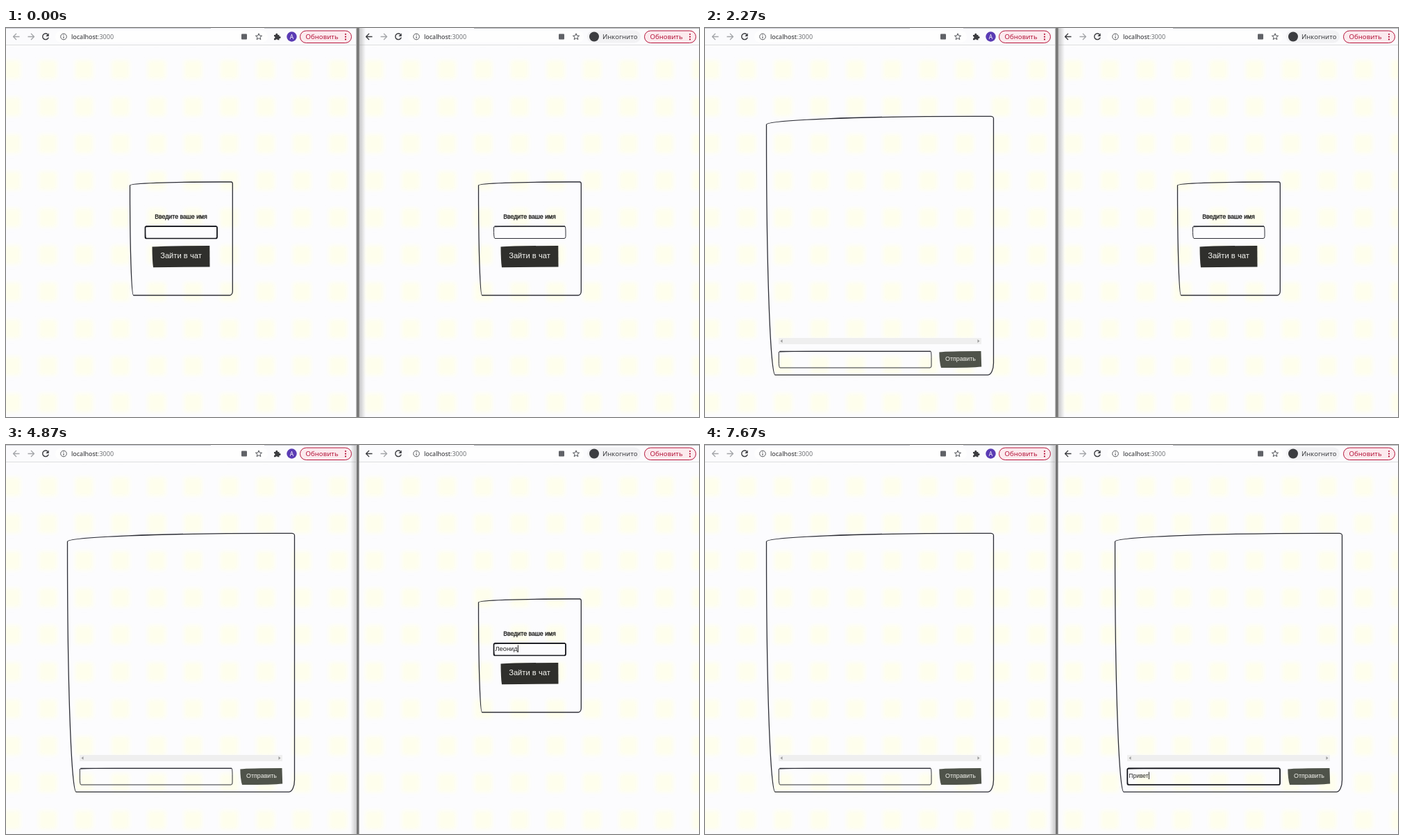
Recreate the animation shown at these times as an HTML page. Size 998 px wide and 561 px high, loop 8 s.

```html
<!DOCTYPE html>
<html lang="ru">
<head>
<meta charset="utf-8">
<title>Чат в двух окнах</title>
<style>
html, body { margin: 0; width: 100%; height: 100%; overflow: hidden; background: #fcfcfe; }
svg { display: block; width: 998px; height: 561px; }
text { font-family: "Liberation Sans", Arial, sans-serif; }
.ui text { font-family: "Noto Sans", "Open Sans", sans-serif; }
</style>
</head>
<body>
<svg id="stage" viewBox="0 0 998 561" xmlns="http://www.w3.org/2000/svg">
  <defs>
    <filter id="soft" x="-50%" y="-50%" width="200%" height="200%"><feGaussianBlur stdDeviation="3"/></filter>
    <pattern id="dots" x="-18" y="33.5" width="52.25" height="53.4" patternUnits="userSpaceOnUse">
      <rect x="13" y="13" width="26" height="27" rx="3" fill="#fefeec" filter="url(#soft)"/>
    </pattern>
    <linearGradient id="fadeR"><stop offset="0" stop-color="#777" stop-opacity=".4"/><stop offset="1" stop-color="#777" stop-opacity="0"/></linearGradient>
    <linearGradient id="fadeL"><stop offset="0" stop-color="#777" stop-opacity="0"/><stop offset="1" stop-color="#777" stop-opacity=".4"/></linearGradient>
    <linearGradient id="edge"><stop offset="0" stop-color="#c4c4c4"/><stop offset=".5" stop-color="#6a6a6a"/><stop offset="1" stop-color="#999"/></linearGradient>
  </defs>
  <rect width="998" height="561" fill="#fcfcfe"/>
  <rect y="25" width="998" height="536" fill="url(#dots)"/>
</svg>
<script>
const INK = '#2d2e36', GREY = '#a3a5a9', DARK = '#3b3c40', RED = '#b5153b';
const LOOP = 8000;
const stage = document.getElementById('stage');

function add(parent, tag, attrs, text) {
  const el = document.createElementNS('http://www.w3.org/2000/svg', tag);
  for (const k in attrs) el.setAttribute(k, attrs[k]);
  if (text) el.textContent = text;
  parent.appendChild(el);
  return el;
}
const rect = (p, x, y, width, height, fill, more) => add(p, 'rect', { x, y, width, height, fill, ...more });
const line = (p, d, stroke, w = 1.2) =>
  add(p, 'path', { d, fill: 'none', stroke, 'stroke-width': w, 'stroke-linejoin': 'round' });
const label = (p, x, y, size, fill, str, more) =>
  add(p, 'text', { x, y, fill, 'font-size': size, ...more }, str);
const show = (el, on) => el.setAttribute('visibility', on ? 'inherit' : 'hidden');

// Box with elliptical corners, radii in the order TL, TR, BR, BL
function wobbly(x, y, w, h, [a, b, c, d, e, f, g, i]) {
  const r = x + w, m = y + h;
  return `M${x} ${y + b}A${a} ${b} 0 0 1 ${x + a} ${y}L${r - c} ${y}A${c} ${d} 0 0 1 ${r} ${y + d}` +
    `L${r} ${m - f}A${e} ${f} 0 0 1 ${r - e} ${m}L${x + g} ${m}A${g} ${i} 0 0 1 ${x} ${m - i}Z`;
}

function field(p, x, y, w, h, size, base) {
  const thin = line(p, wobbly(x, y, w, h, [60, 1, 1, 8, 2, 3, 1.5, 9]), INK, 1);
  const top = line(p, `M${x + 1} ${y}H${x + w - 1}`, INK, 1.3);
  const bold = add(p, 'rect', { x, y, width: w, height: h, rx: 2, fill: 'none', stroke: '#15161c', 'stroke-width': 1.7 });
  const text = label(p, x + 2, base, size, '#222');
  const caret = rect(p, 0, base - 8.5, 1, 10.5, '#222');
  return (str, focus, hasCaret) => {
    bold.setAttribute('opacity', focus);
    text.textContent = str;
    show(caret, hasCaret);
    caret.setAttribute('x', x + 2.2 + (str ? text.getComputedTextLength() : 0));
  };
}

function page(dx) {
  const root = add(stage, 'g', { transform: `translate(${dx})` });

  const login = add(root, 'g');
  line(login, wobbly(178.5, 222, 147.8, 163.5, [130, 5, 2, 3, 4, 6, 5, 150]), INK, 1.3);
  label(login, 252, 274.5, 8.75, '#181818', 'Введите ваше имя',
    { 'text-anchor': 'middle', stroke: '#181818', 'stroke-width': .3 });
  const setName = field(login, 200.5, 286, 103.5, 17.5, 9.3, 297);
  add(login, 'path', { d: 'M210.5 315.5Q230 314 293.3 314L293.5 344.5L212 345.2Q210.6 335 210.5 315.5Z', fill: '#2f2f2c' });
  label(login, 252, 332, 11.2, '#f6f6f2', 'Зайти в чат', { 'text-anchor': 'middle' });

  const chat = add(root, 'g');
  line(chat, wobbly(88.5, 127.3, 327, 373, [300, 12, 4, 3, 8, 17, 12.5, 345]), INK, 1.3);
  const bar = add(chat, 'g');
  rect(bar, 106, 447, 292, 9, '#efefef');
  add(bar, 'path', { d: 'M111.5 449V454L108.5 451.5ZM392.5 449V454L395.5 451.5Z', fill: '#9c9c9c' });
  const setMsg = field(chat, 106.3, 466.3, 219.7, 23.7, 8.5, 480);
  add(chat, 'path', { d: 'M337.3 467.5Q350 466 397.5 466L398.2 488.5Q385 490 340 490Q337.5 482 337.3 467.5Z', fill: '#4f534a' });
  label(chat, 368, 480, 8.9, '#f4f4ee', 'Отправить', { 'text-anchor': 'middle' });

  return { login, chat, bar, setName, setMsg };
}

function arrow(p, x, dir, color) {
  line(p, `M${x - 4.5 * dir} 12.5H${x + 4.5 * dir}M${x} 8L${x + 4.5 * dir} 12.5L${x} 17`, color, 1.3);
}

function toolbar(x, right) {
  const g = add(stage, 'g', { class: 'ui' });
  const w = right ? 490 : 504, icons = right ? 800 : 343, end = right ? 919.5 : 423.5;
  rect(g, x, 0, w, 24.5, '#fbfbfd');
  rect(g, x, 24, w, 1, '#dedfe0');
  if (right) rect(g, 674, 0, 324, 1, '#b4b6bb');
  else {
    rect(g, 0, 0, 295, 1, '#c9cad2');
    rect(g, 372, 0, 132, 1, '#c9cad2');
  }
  rect(g, x + 71, 4, right ? 253 : 306, 17, '#fefefe', { rx: 8.5 });
  arrow(g, x + 15, -1, right ? DARK : GREY);
  arrow(g, x + 36, 1, GREY);
  line(g, `M${x + 60} 9.2A4.3 4.3 0 1 0 ${x + 61.2} 13.5`, DARK, 1.4);
  add(g, 'path', { d: `M${x + 61.7} 7.5V12H${x + 57.2}Z`, fill: DARK });
  add(g, 'circle', { cx: x + 83, cy: 12.5, r: 4.3, fill: 'none', stroke: '#55575b' });
  line(g, `M${x + 83} 9.8V11M${x + 83} 12V15`, '#55575b', 1.1);
  const url = label(g, x + 94, 16, 9, '#25262a');
  add(url, 'tspan', {}, 'localhost');
  add(url, 'tspan', { fill: '#707276' }, ':3000');

  rect(g, icons - 4, 8.5, 8, 8, '#606267', { rx: 1 });
  let star = '';
  for (let i = 0; i < 10; i++) {
    const a = Math.PI * (i / 5 - .5), r = i % 2 ? 2.1 : 4.8;
    star += `${i ? 'L' : 'M'}${icons + 21 + r * Math.cos(a)} ${12.7 + r * Math.sin(a)}`;
  }
  line(g, star + 'Z', '#505257', 1);

  if (right) {
    rect(g, 837, 3.5, 77, 18, '#f2f2f4', { rx: 9 });
    add(g, 'circle', { cx: 847, cy: 12.5, r: 7, fill: '#3c3d41' });
    label(g, 859, 16, 9.5, '#3c3d41', 'Инкогнито', { 'font-weight': 500 });
  } else {
    add(g, 'path', { d: 'M386 10H388.3A1.6 1.6 0 1 1 391.3 10H393.5V12A1.6 1.6 0 1 1 393.5 15V17.2H391.2A1.5 1.5 0 0 0 388.4 17.2H386V15A1.5 1.5 0 0 0 386 12Z', fill: DARK });
    add(g, 'circle', { cx: 411.5, cy: 12.5, r: 7.2, fill: '#5a3bb4' });
    label(g, 411.5, 15.7, 8.5, '#fff', 'A', { 'text-anchor': 'middle' });
  }
  rect(g, end, 4, 74, 17.5, '#fceaee', { rx: 8.8, stroke: RED });
  label(g, end + 8, 16.2, 9.6, RED, 'Обновить', { 'font-weight': 500 });
  for (const y of [9, 12.7, 16.4]) add(g, 'circle', { cx: end + 65.5, cy: y, r: 1.1, fill: RED });
}

const left = page(0), right = page(502);
toolbar(0, false);
toolbar(508, true);

const frontL = add(stage, 'g'), frontR = add(stage, 'g');
rect(frontL, 504, 0, 5, 561, 'url(#edge)');
rect(frontL, 509, 0, 9, 561, 'url(#fadeR)');
rect(frontR, 496, 0, 9, 561, 'url(#fadeL)');
rect(frontR, 505, 0, 3.5, 561, '#757575');

// Each entry is the moment the next letter appears
const typing = {
  nameL: ['Виктор', [330, 600, 1070, 1330, 1600, 1730]],
  nameR: ['Леонид', [3870, 4200, 4270, 4400, 4600, 4870]],
  hello: ['Привет', [7000, 7200, 7330, 7400, 7530, 7670]]
};
const typed = (key, t) => typing[key][0].slice(0, typing[key][1].filter(s => t >= s).length);

function setPage(p, t, enter) {
  show(p.login, t < enter);
  show(p.chat, t >= enter);
  p.bar.setAttribute('transform', `translate(0 ${t < enter + 70 ? .8 : 0})`);
}

function draw(t) {
  const switched = t >= 3270;
  show(frontL, !switched);
  show(frontR, switched);
  setPage(left, t, 2200);
  setPage(right, t, 5330);
  left.setName(typed('nameL', t), 1, t >= 330 && t < 2200);
  left.setMsg('', 0, false);
  right.setName(typed('nameR', t), switched ? 1 : 0, switched && t < 5330);
  const focus = Math.min(1, Math.max(0, (t - 6400) / 235));
  right.setMsg(typed('hello', t), focus, t >= 6400);
}

const start = performance.now();
function tick() {
  draw((performance.now() - start) % LOOP);
  requestAnimationFrame(tick);
}
draw(0);
requestAnimationFrame(tick);
</script>
</body>
</html>
```
